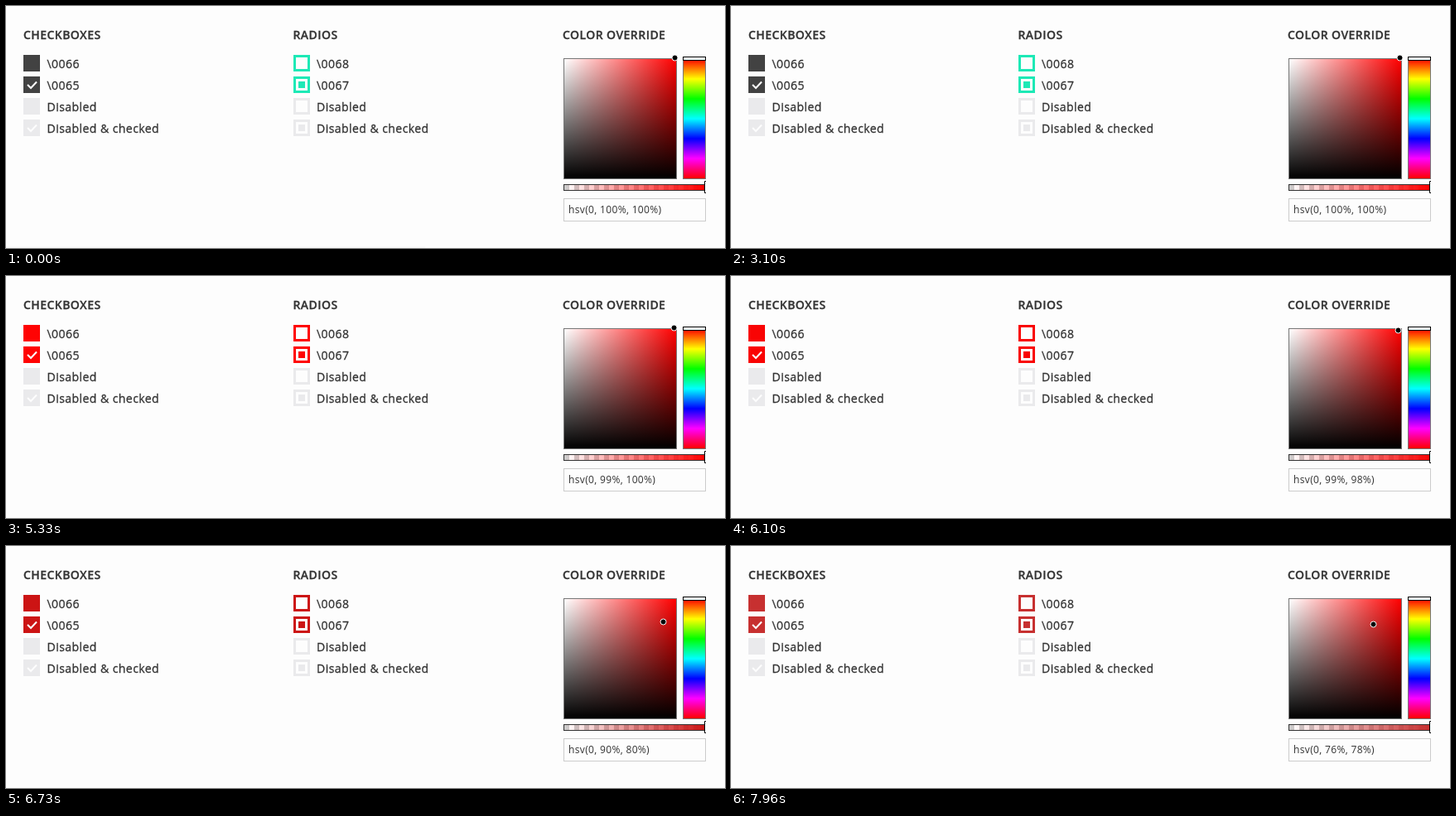
An HTML page that plays this animation: 868 px wide and 292 px high, repeating every 8 s.

```html
<!DOCTYPE html>
<html lang="en">
<head>
<meta charset="utf-8">
<title>Form controls</title>
<style>
html, body { margin: 0; width: 868px; height: 292px; overflow: hidden; background: #fdfdfd; }
body { position: relative; --accent: #424242; --radio: #1de9b6; --pick: #f00; }
div { position: absolute; box-sizing: border-box; border: 1px solid #777; }
#shade {
  left: 673px; top: 63px; width: 137px; height: 146px;
  background: linear-gradient(transparent, #000), linear-gradient(90deg, #fff, #f00);
}
#hue {
  left: 817px; top: 63px; width: 28px; height: 146px;
  background: linear-gradient(#f00, #ff0, #0f0, #0ff, #00f, #f0f, #f00);
}
#alpha {
  left: 673px; top: 215px; width: 172px; height: 8px; border-color: #333;
  background: linear-gradient(90deg, transparent, var(--pick)),
    repeating-conic-gradient(#ccc 0 25%, #fff 0 50%) 6px 0 / 12px 12px;
}
#field { left: 673px; top: 232px; width: 172px; height: 28px; border-color: #ccc; }
#edge { left: 0; top: 290px; width: 506px; height: 2px; border: 0; background: #f9f9f9; }
svg { position: absolute; left: 0; top: 0; }
text {
  font: 14px "Open Sans", "Noto Sans", sans-serif; letter-spacing: .45px;
  fill: #333; stroke: #333; stroke-width: .3px;
}
.head { font-weight: 600; }
#value { font-size: 12px; letter-spacing: .35px; stroke: none; }
</style>
</head>
<body>
<div id="edge"></div>
<div id="shade"></div>
<div id="hue"></div>
<div id="alpha"></div>
<div id="field"></div>
<svg width="868" height="292">
  <text class="head" x="20.9" y="40">CHECKBOXES</text>
  <text class="head" x="346.4" y="40">RADIOS</text>
  <text class="head" x="671.9" y="40">COLOR OVERRIDE</text>
  <g id="controls"></g>
  <rect x="817.5" y="61.5" width="27" height="4" fill="#fff" stroke="#000"/>
  <path d="M845 211.5h-1.5v14h1.5" fill="#fff" stroke="#000"/>
  <circle id="knob" r="3.5" stroke="#fff"/>
  <text id="value" x="679" y="250"></text>
</svg>
<script>
const $ = id => document.getElementById(id);
const pale = '#eaeaec';

const label = (x, y, s) => `<text x="${x}" y="${y + 16}">${s}</text>`;

const checkbox = (y, color, on) =>
  `<rect x="21" y="${y}" width="20" height="20" fill="${color}"/>` +
  (on ? `<path d="M26 ${y + 10}l4 4 7-7.5" fill="none" stroke="#fdfdfd" stroke-width="2"/>` : '');

const radio = (y, color, on) =>
  `<rect x="348.5" y="${y + 1.5}" width="17" height="17" fill="none" stroke="${color}" stroke-width="3"/>` +
  (on ? `<rect x="353" y="${y + 6}" width="8" height="8" fill="${color}"/>` : '');

const rows = [['\\0066', '\\0068'], ['\\0065', '\\0067'], ['Disabled', 'Disabled'],
  ['Disabled &amp; checked', 'Disabled &amp; checked']];
$('controls').innerHTML = rows.map(([left, right], i) => {
  const y = 59 + 26 * i, on = i % 2, off = i > 1;
  return checkbox(y, off ? pale : 'var(--accent)', on) + label(49.5, y, left) +
    radio(y, off ? pale : 'var(--radio)', on) + label(375, y, right);
}).join('');

// time, saturation, value
const keys = [[5330, .99, 1], [6000, .99, 1], [6430, .97, .9], [6730, .9, .8],
  [6800, .87, .78], [6900, .86, .78], [7400, .86, .78], [7960, .76, .78]];

function pick(t) {
  if (t < keys[0][0]) return [1, 1];
  const i = keys.findIndex(k => k[0] > t);
  if (i < 0) return keys.at(-1).slice(1);
  const a = keys[i - 1], b = keys[i], p = (t - a[0]) / (b[0] - a[0]);
  return [1, 2].map(n => a[n] + (b[n] - a[n]) * p);
}

function draw(now) {
  const t = now % 8000;
  const [s, v] = pick(t);
  const low = 255 * v * (1 - s);
  const color = `rgb(${255 * v}, ${low}, ${low})`;
  const style = document.body.style;
  const picked = t >= keys[0][0];
  style.setProperty('--pick', color);
  style.setProperty('--accent', picked ? color : '#424242');
  style.setProperty('--radio', picked ? color : '#1de9b6');
  $('edge').hidden = t >= 3100;
  $('knob').setAttribute('transform',
    `translate(${Math.round(672 + 135 * s) + .5} ${Math.round(62 + 145 * (1 - v)) + .5})`);
  $('value').textContent = `hsv(0, ${Math.round(s * 100)}%, ${Math.round(v * 100)}%)`;
  requestAnimationFrame(draw);
}
draw(performance.now());
</script>
</body>
</html>
```
